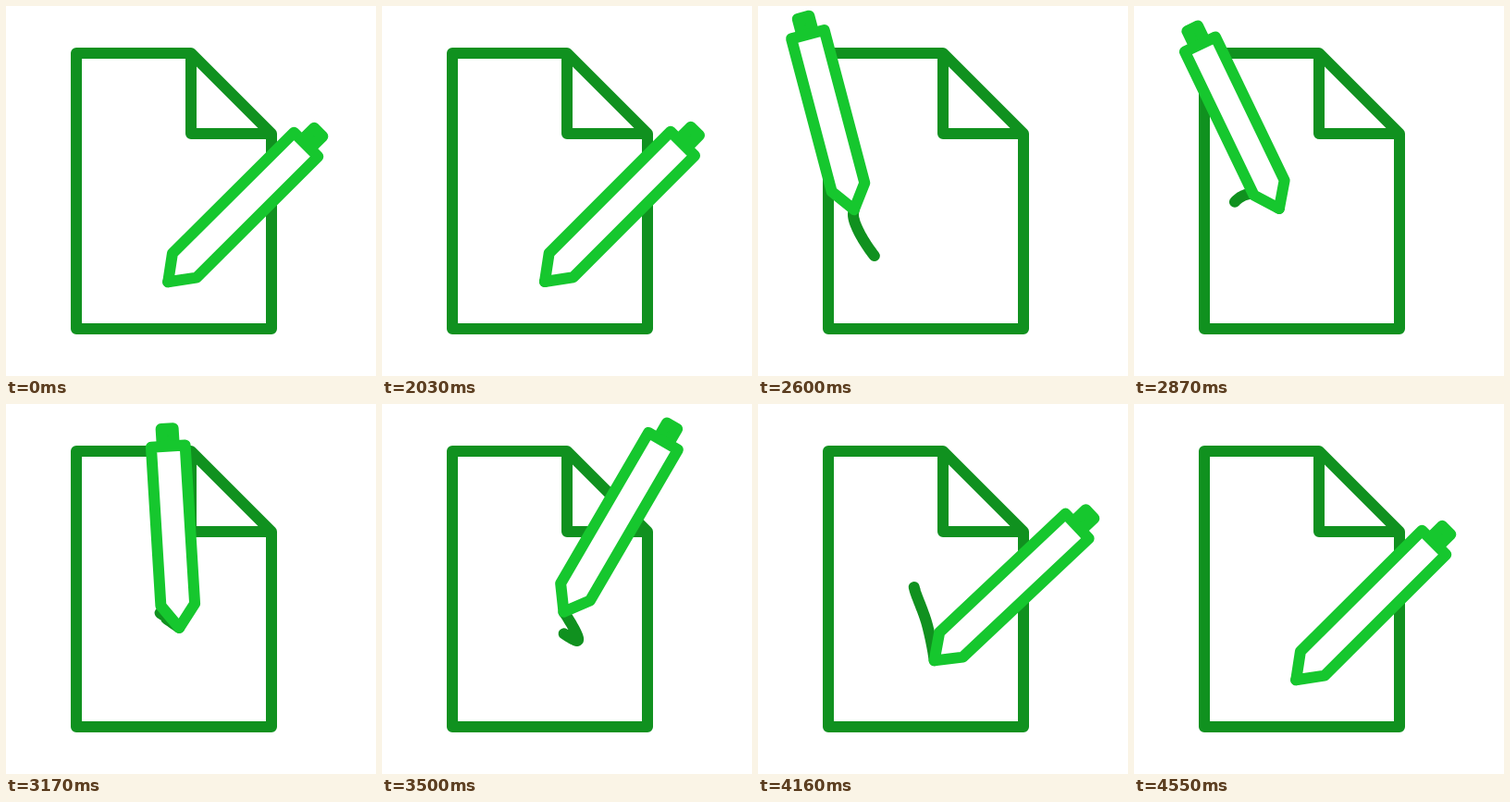
Write an HTML page that moves like this. It is 400x400 px and loops after 4580 ms.

```html
<!DOCTYPE html>
<html lang="en">
<head>
<meta charset="utf-8">
<title>Pen writing on a page</title>
<style>
html, body { margin: 0; width: 100%; height: 100%; overflow: hidden; background: #fff; }
svg { display: block; width: 100vw; height: 100vh; }
path { fill: none; stroke: #10911f; stroke-width: 12; stroke-linecap: round; stroke-linejoin: round; }
#pen path { stroke: #16c72e; }
#body { fill: #fff; }
#cap { fill: #16c72e; }
</style>
</head>
<body>
<svg viewBox="0 0 400 400">
  <path d="M76 51H200L287 138V349H76ZM200 51V138H287"/>
  <path id="trail"/>
  <g id="pen">
    <path id="cap"/>
    <path id="body"/>
  </g>
</svg>
<script>
const LOOP = 4580, START = 2030, STEP = 30, BEAT = 180;

// one pose per beat: writing point x, y and upper end x, y
const POSES = [
  [176, 298, 325, 148.7],
  [167, 301, 284, 130],
  [129, 274, 168, 73],
  [103, 226, 61, 33],
  [127, 203, 56, 34],
  [169, 227.6, 85.4, 44.7],
  [176, 234, 153, 46],
  [211, 256, 221, 44],
  [200.6, 231, 298.5, 42],
  [171, 192, 308, 30],
  [169.4, 200.6, 321, 54],
  [183, 239, 339, 97],
  [191, 283, 345, 137],
  [184, 297, 336, 149],
  [175.2, 298.3, 324.3, 149.7]
];
const LAST = POSES.length - 1, WRITE = LAST * BEAT;

const $ = id => document.getElementById(id);
const clamp = (v, a, b) => Math.min(b, Math.max(a, v));
const poseAt = i => POSES[clamp(i, 0, LAST)];

// Catmull-Rom spline through the poses
function pose(t) {
  const p = clamp(t / BEAT, 0, LAST), i = Math.min(Math.floor(p), LAST - 1), u = p - i;
  const [a, b, c, d] = [-1, 0, 1, 2].map(k => poseAt(i + k));
  return b.map((v, k) => v + u / 2 * (c[k] - a[k] +
    u * (2 * a[k] - 5 * v + 4 * c[k] - d[k] + u * (3 * (v - c[k]) + d[k] - a[k]))));
}

// the ink fades behind the tip, later and later until it catches up
function trail(t) {
  const lag = Math.min(0.4 * t, 130 + 0.11 * t, 0.9 * (WRITE - t));
  const n = Math.ceil(lag / 10) + 1, pts = [];
  for (let i = 0; i <= n; i++) {
    const [x, y] = pose(t - lag * (1 - i / n));
    pts.push(`${x.toFixed(2)} ${y.toFixed(2)}`);
  }
  return "M" + pts.join("L");
}

function draw(t) {
  const [x, y, tx, ty] = pose(t);
  const len = Math.hypot(tx - x, ty - y);
  const angle = Math.atan2(tx - x, y - ty) * 180 / Math.PI;
  $("trail").setAttribute("d", trail(t));
  $("pen").setAttribute("transform", `translate(${x} ${y}) rotate(${angle})`);
  $("body").setAttribute("d", `M0 0L-18.4 -25V${-len}H18.4V-25Z`);
  $("cap").setAttribute("d", `M-6.5 ${-len - 4}V${-len - 19}H6.5V${-len - 4}Z`);
}

const begin = performance.now();
function tick() {
  const t = (performance.now() - begin) % LOOP - START;
  // rest in the final pose, then move in even steps
  draw(t < 0 ? WRITE : Math.min(Math.floor(t / STEP) * STEP, WRITE));
  requestAnimationFrame(tick);
}
tick();
</script>
</body>
</html>
```
